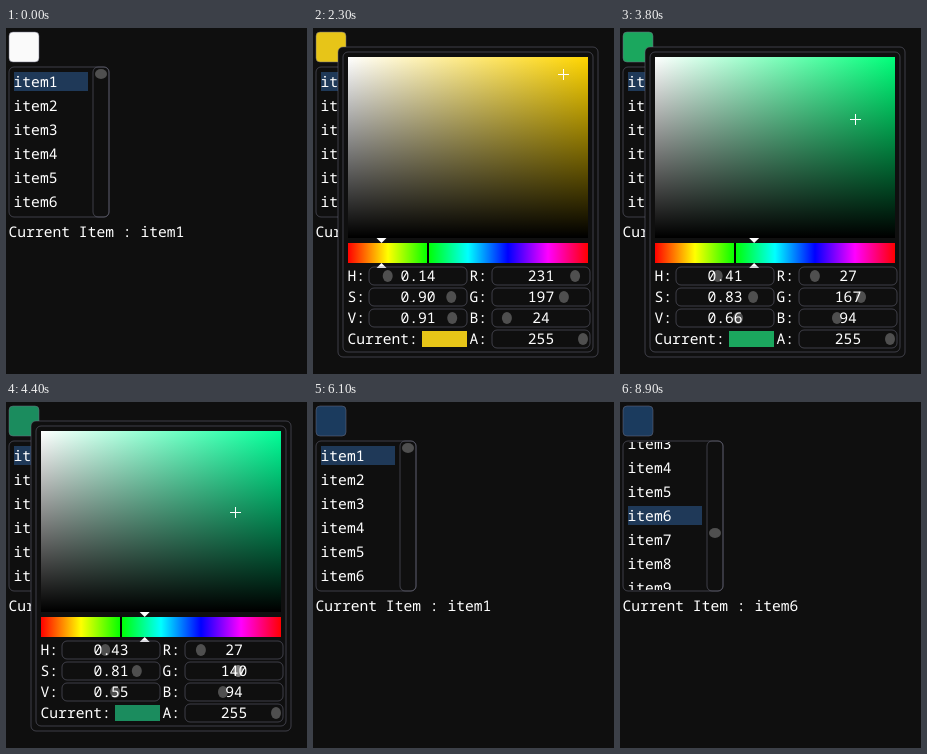
These frames come from a looping animation (301 by 346 pixels, 9700 ms). An HTML page with a canvas:

```html
<!DOCTYPE html>
<html lang="en">
<head>
<meta charset="utf-8">
<title>Colour picker and list box</title>
<style>
html, body { margin: 0; width: 100%; height: 100%; overflow: hidden; background: #0f0f0f; }
canvas { display: block; width: 301px; height: 346px; }
</style>
</head>
<body>
<canvas id="stage" width="301" height="346"></canvas>
<script>
const ctx = document.getElementById('stage').getContext('2d');
const LOOP = 9700;
const BG = '#0f0f0f', EDGE = 'rgba(110,110,128,0.5)', WHITE = '#ffffff';
const GRAB = { idle: '#4f4f4f', hover: '#696969', active: '#828282' };
const ITEM = { selected: '#1f3958', hover: '#387bcb', active: '#4296fa' };
const SV = { x: 35, y: 29, w: 240, h: 180 };
const BAR = { y: 215, h: 20 };

const lerp = (a, b, k) => a + (b - a) * k;

// Progress from 0 to 1 in n jumps, 100 ms apart, the first at start.
function steps(t, start, n) {
  const i = Math.floor((t - start) / 100) + 1;
  return Math.min(Math.max(i, 0), n) / n;
}

function toRgb([h, s, v]) {
  return [5, 3, 1].map(n => {
    const k = (n + h * 6) % 6;
    return Math.floor(255 * v * (1 - s * Math.max(0, Math.min(k, 4 - k, 1))));
  });
}

function toHsv([r, g, b]) {
  const max = Math.max(r, g, b), d = max - Math.min(r, g, b);
  const h = max === r ? ((g - b) / d + 6) % 6
    : max === g ? 2 + (b - r) / d : 4 + (r - g) / d;
  return [h / 6, d / max, max / 255];
}

function colorAt(t) {
  if (t >= 4400) {
    const rgb = [27, Math.round(lerp(167, 59, steps(t, 4400, 4))), 94];
    return { rgb, hsv: toHsv(rgb) };
  }
  let hsv = [0, 0, 0.981];
  if (t >= 1300) hsv = [0, 0.875, 0.885];
  if (t >= 1400) {
    const hue = 0.413 * (1 - Math.pow(1 - steps(t, 2300, 6), 2.26));
    const k = steps(t, 3500, 4);
    hsv = [hue, lerp(0.896, 0.8345, k), lerp(0.9075, 0.656, k)];
  }
  return { rgb: toRgb(hsv), hsv };
}

const css = rgb => `rgb(${rgb.join(',')})`;

function rect(x, y, w, h, fill) {
  ctx.fillStyle = fill;
  ctx.fillRect(x, y, w, h);
}

// The outline is centred on whole pixels, so it is soft over two of them.
function frame(x, y, w, h, r, fill) {
  ctx.beginPath();
  ctx.roundRect(x, y, w, h, r);
  if (fill) {
    ctx.fillStyle = fill;
    ctx.fill();
  }
  ctx.strokeStyle = EDGE;
  ctx.lineWidth = 1;
  ctx.stroke();
}

function grab(x, y, rx, ry, fill) {
  ctx.beginPath();
  ctx.ellipse(x, y, rx, ry, 0, 0, Math.PI * 2);
  ctx.fillStyle = fill;
  ctx.fill();
}

function text(str, x, y, align = 'left') {
  ctx.fillStyle = WHITE;
  ctx.textAlign = align;
  ctx.fillText(str, x - 0.5, y);
}

function slider(label, labelX, x, row, k, value, state = 'idle') {
  const y = 239 + row * 21;
  frame(x, y, 98, 18, 5);
  grab(x + 7 + 84 * k, y + 9, 5, 6, GRAB[state]);
  text(label, labelX, y + 14);
  text(value, x + 49.5, y + 14, 'center');
}

function triangle(x, base, tip) {
  ctx.beginPath();
  ctx.moveTo(x - 5, base);
  ctx.lineTo(x + 5, base);
  ctx.lineTo(x, tip);
  ctx.fillStyle = WHITE;
  ctx.fill();
}

function gradient(x1, y1, stops) {
  const g = ctx.createLinearGradient(SV.x, SV.y, x1, y1);
  stops.forEach((c, i) => g.addColorStop(i / (stops.length - 1), c));
  return g;
}

function drawPicker(t, { rgb, hsv }) {
  const right = SV.x + SV.w;
  const [h, s, v] = hsv;
  frame(25, 19, 260, 310, 5, BG);
  frame(30, 24, 250, 300, 5);

  rect(SV.x, SV.y, SV.w, SV.h, gradient(right, SV.y, ['#fff', `hsl(${h * 360},100%,50%)`]));
  rect(SV.x, SV.y, SV.w, SV.h, gradient(SV.x, SV.y + SV.h, ['rgba(0,0,0,0)', '#000']));
  rect(SV.x, SV.y + SV.h, SV.w, 1, '#000');
  const cx = Math.round(SV.x + SV.w * s), cy = Math.round(SV.y + SV.h * (1 - v));
  rect(cx - 5, cy, 11, 1, WHITE);
  rect(cx, cy - 5, 1, 11, WHITE);

  const hues = ['#f00', '#ff0', '#0f0', '#0ff', '#00f', '#f0f', '#f00'];
  rect(SV.x, BAR.y, SV.w, BAR.h, gradient(right, SV.y, hues));
  rect(114, BAR.y, 2, BAR.h, '#000');
  const hx = SV.x + SV.w * h;
  triangle(hx, BAR.y - 5, BAR.y);
  triangle(hx, BAR.y + BAR.h + 5, BAR.y + BAR.h);

  const green = t < 4400 || t >= 5100 ? 'idle' : t < 4900 ? 'active' : 'hover';
  hsv.forEach((c, i) => slider('HSV'[i] + ':', 35, 56, i, c, c.toFixed(2)));
  [...rgb, 255].forEach((c, i) =>
    slider('RGBA'[i] + ':', 157, 179, i, c / 255, String(c), i === 1 ? green : 'idle'));
  text('Current:', 35, 316);
  rect(109, 303, 45, 16, css(rgb));
}

function scrollState(t) {
  if (t < 6900 || t >= 8100) return 'idle';
  return t >= 7300 && t < 8000 ? 'active' : 'hover';
}

function itemFill(n, current, t) {
  if (n === 6 && t >= 8100 && t < 8900) {
    return t >= 8400 && t < 8500 ? ITEM.active : ITEM.hover;
  }
  return n === current ? ITEM.selected : null;
}

function drawList(t) {
  const current = t < 8500 ? 1 : 6;
  const drag = 85 * Math.pow(steps(t, 7300, 6), 1.28);
  const offset = Math.round(drag * 60 / 85);
  ctx.save();
  ctx.beginPath();
  ctx.rect(4, 40, 83, 148);
  ctx.clip();
  for (let n = 1; n <= 10; n++) {
    const y = 20 + n * 24 - offset;
    const fill = itemFill(n, current, t);
    if (fill) rect(8, y, 74, 19, fill);
    text('item' + n, 8, y + 15);
  }
  ctx.restore();
  frame(3, 39, 100, 150, 5);
  frame(87, 39, 16, 150, 5);
  grab(95, 46 + drag, 6, 5, GRAB[scrollState(t)]);
  text('Current Item : item' + current, 3, 209);
}

function draw(t) {
  ctx.font = '14.667px "Noto Sans Mono", "DejaVu Sans Mono", monospace';
  ctx.textRendering = 'geometricPrecision';
  rect(0, 0, 301, 346, BG);
  const color = colorAt(t);
  frame(3, 4, 30, 30, 4, css(color.rgb));
  drawList(t);
  if (t >= 700 && t < 6100) drawPicker(t, color);
}

const began = performance.now();
function tick() {
  draw((performance.now() - began) % LOOP);
  requestAnimationFrame(tick);
}
tick();
</script>
</body>
</html>
```
